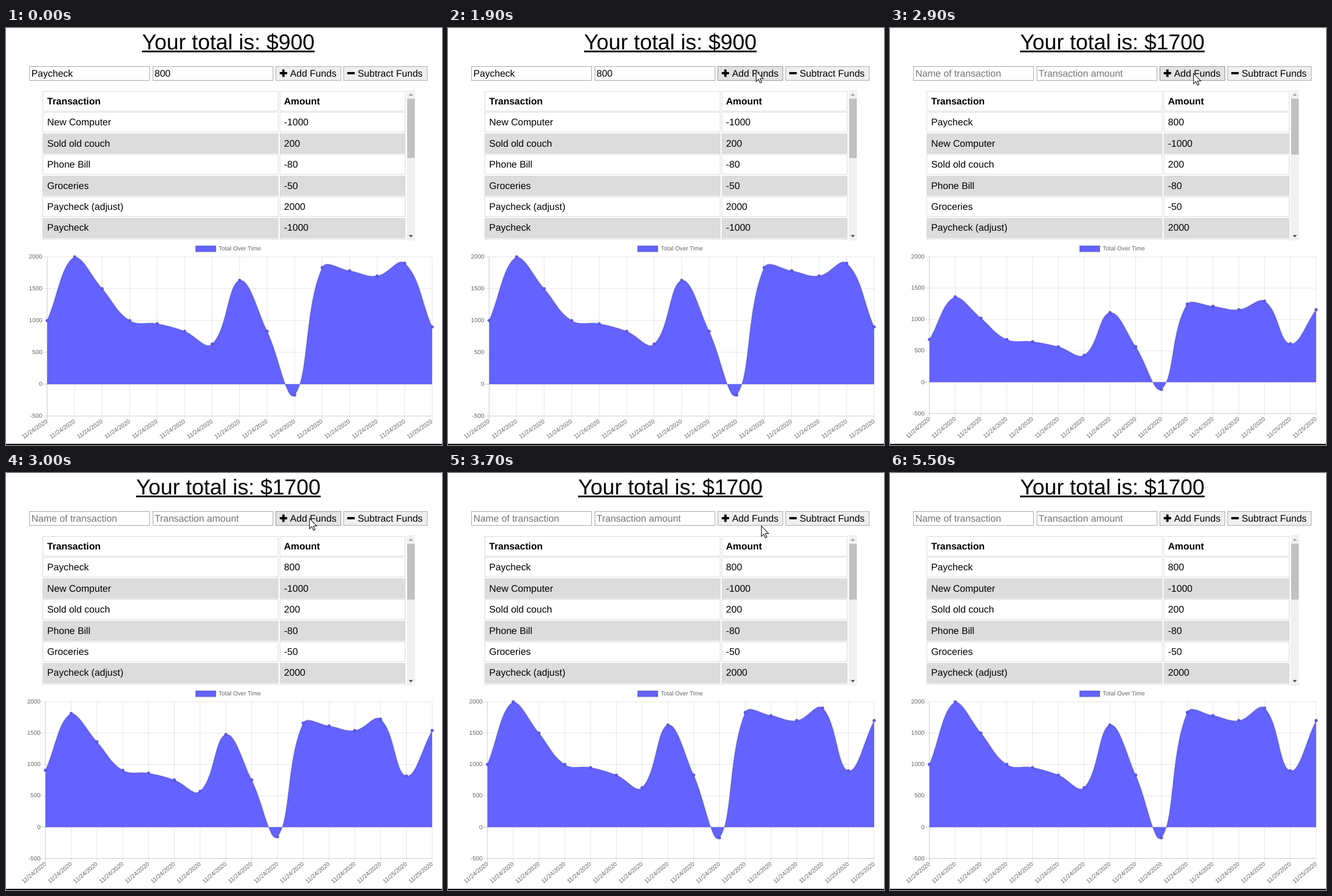
These frames come from a looping animation (752 by 720 pixels, 5.8 s). An HTML page with a canvas:

```html
<!DOCTYPE html>
<html lang="en">
<head>
<meta charset="utf-8">
<title>Budget tracker</title>
<style>
html, body { margin: 0; width: 100%; height: 100%; overflow: hidden; background: #fff; }
canvas { position: absolute; left: 0; top: 0; display: block; }
h1 {
  position: absolute; left: 15px; top: 3px; width: 737px; margin: 0;
  font: 37.35px/42px Arial, "Liberation Sans", sans-serif;
  text-align: center; text-decoration: underline; text-decoration-skip-ink: none;
  text-rendering: geometricPrecision; color: #000;
}
</style>
</head>
<body>
<canvas id="stage" width="752" height="720"></canvas>
<h1 id="total"></h1>
<script>
const ctx = document.getElementById("stage").getContext("2d");
const heading = document.getElementById("total");
const FONT = "Arial, 'Liberation Sans', sans-serif";
const LOOP = 5800;
const ADDED_AT = 2900;

const TICKS = [0, 1, 3, 6, 7, 9, 10, 12, 13, 14, 16, 17, 19, 20, 22, 23, 24, 26, 27,
  29, 30, 32, 33, 35, 36, 37, 39, 40, 42, 43, 45, 46, 47, 49, 50, 52, 53, 55];

const ENTRIES = [
  ["Paycheck", 800], ["New Computer", -1000], ["Sold old couch", 200],
  ["Phone Bill", -80], ["Groceries", -50], ["Paycheck (adjust)", 2000],
  ["Paycheck", -1000], ["Paycheck", 800]
];
const TOTALS = [1000, 2000, 1500, 1000, 950, 830, 630, 1630, 830, -170,
  1830, 1780, 1700, 1900, 900, 1700];

const BEFORE = { total: 900, count: 15, left: 71, bottom: 670, tilt: 34, thumb: 102.5 };
const AFTER = { total: 1700, count: 16, left: 68, bottom: 665.5, tilt: 40, thumb: 96.5 };

// Pointer path: time, x, y.
const PATH = [
  [600, 600, 470], [700, 538, 330], [900, 527, 219], [1000, 531, 74], [1900, 531, 74],
  [2300, 523, 78], [3300, 523, 78], [3700, 540, 91], [4000, 596, 270],
  [4300, 690, 432], [4500, 736, 470]
];

ctx.textRendering = "geometricPrecision";

function rect(x, y, w, h, fill, line) {
  ctx.fillStyle = fill;
  ctx.fillRect(x, y, w, h);
  if (!line) return;
  ctx.strokeStyle = line;
  ctx.lineWidth = 1;
  ctx.strokeRect(x + 0.5, y + 0.5, w - 1, h - 1);
}

function text(str, x, y, size = 16.55, color = "#000", weight = "", align = "left", base = "alphabetic") {
  ctx.font = `${weight} ${size}px ${FONT}`;
  ctx.fillStyle = color;
  ctx.textAlign = align;
  ctx.textBaseline = base;
  ctx.fillText(str, x, y);
}

function line(x1, y1, x2, y2, color) {
  ctx.strokeStyle = color;
  ctx.lineWidth = 0.9;
  ctx.beginPath();
  ctx.moveTo(x1, y1);
  ctx.lineTo(x2, y2);
  ctx.stroke();
}

function poly(points) {
  ctx.beginPath();
  points.forEach(([x, y]) => ctx.lineTo(x, y));
  ctx.closePath();
}

function bar(x, y, w, h) {
  ctx.fillStyle = "#000";
  ctx.beginPath();
  ctx.roundRect(x, y, w, h, 1);
  ctx.fill();
}

function drawForm(t) {
  const done = t >= ADDED_AT;
  const fields = done ? ["Name of transaction", "Transaction amount"] : ["Paycheck", "800"];
  fields.forEach((str, i) => {
    const x = 40 + i * 212.5;
    rect(Math.round(x), 66, 208, 25, "#fff", "#a6a6a6");
    text(str, x + 3.7, 84, 16.55, done ? "#757575" : "#000");
  });

  let look = ["#efefef", "#adadad"];
  if (t >= 1200 && t < 3600) look = ["#e3e3e3", "#939393"];
  if (t >= 2600 && t < ADDED_AT) look = ["#f4f4f4", "#bdbdbd"];
  rect(465, 66, 113, 25, ...look);
  rect(582, 66, 145, 25, "#efefef", "#adadad");
  bar(472, 76, 13, 4);
  bar(476.5, 71.5, 4, 13);
  bar(588.5, 76, 13, 4);
  text("Add Funds", 490, 84);
  text("Subtract Funds", 606.5, 84);
}

function drawTable(state) {
  const rows = ENTRIES.slice(state === AFTER ? 0 : 1);
  ctx.save();
  ctx.beginPath();
  ctx.rect(60, 107, 650, 260);
  ctx.clip();
  for (let i = 0; i < 8; i++) {
    const top = 109 + 36.45 * i;
    const y = Math.round(top);
    const fill = i && i % 2 === 0 ? "#dcdcdc" : "#fff";
    rect(63, y, 407, 35, fill, "#dadada");
    rect(472, y, 217, 35, fill, "#dadada");
    const [name, amount] = i ? rows[i - 1] || ["", ""] : ["Transaction", "Amount"];
    const weight = i ? "" : "bold";
    const size = i ? 16.55 : 16.45;
    const base = Math.round(top + 22.75);
    text(name, 71, base, size, "#000", weight);
    text(amount, 479.5, base, size, "#000", weight);
  }
  ctx.restore();

  rect(691, 107, 14.5, 260, "#f1f1f1");
  rect(692, 122, 13, state.thumb, "#c1c1c1");
  ctx.fillStyle = "#a3a3a3";
  poly([[694.5, 117], [698.2, 113], [702, 117]]);
  ctx.fill();
  ctx.fillStyle = "#505050";
  poly([[694.5, 357.5], [698.2, 361.5], [702, 357.5]]);
  ctx.fill();
}

// Smooth curve handles with tension 0.4, kept inside the plot.
function addHandles(pts, box) {
  const cap = (x, y) => [
    Math.min(Math.max(x, box.left), box.right),
    Math.min(Math.max(y, box.top), box.bottom)
  ];
  pts.forEach((p, i) => {
    const a = pts[i - 1] || p, b = pts[i + 1] || p;
    const da = Math.hypot(p.x - a.x, p.y - a.y);
    const db = Math.hypot(b.x - p.x, b.y - p.y);
    const ka = 0.4 * da / (da + db), kb = 0.4 * db / (da + db);
    p.in = cap(p.x - ka * (b.x - a.x), p.y - ka * (b.y - a.y));
    p.out = cap(p.x + kb * (b.x - a.x), p.y + kb * (b.y - a.y));
  });
}

function drawLegend() {
  rect(327, 376, 35, 10.4, "#6463ff");
  ctx.strokeStyle = "rgba(0,0,0,0.1)";
  ctx.lineWidth = 2.6;
  ctx.strokeRect(327, 376, 35, 10.4);
  text("Total Over Time", 366.8, 381.2, 10.4, "#666", "", "left", "middle");
}

function drawChart(state, grow) {
  const { left, bottom, count, tilt } = state;
  const top = 395, right = 735;
  const step = (right - left) / (count - 1);
  const yOf = v => top + (2000 - v) / 2500 * (bottom - top);
  const zero = yOf(0);
  const faint = "rgba(0,0,0,0.12)", strong = "rgba(0,0,0,0.25)";

  for (let v = 2000; v >= -500; v -= 500) {
    const y = yOf(v);
    line(left - 8.7, y, right, y, v ? faint : strong);
    text(v, left - 8.5, y + 0.3, 10.4, "#666", "", "right", "middle");
  }
  line(left, bottom, right, bottom, faint);
  for (let i = 0; i < count; i++) {
    const x = left + i * step;
    line(x, top, x, bottom + 8.7, i ? faint : strong);
    ctx.save();
    ctx.translate(x, bottom + 8.7);
    ctx.rotate(-tilt * Math.PI / 180);
    text(`11/${i < 14 ? 24 : 25}/2020`, 0, 0, 10.3, "#666", "", "right", "middle");
    ctx.restore();
  }

  const pts = TOTALS.slice(0, count).map((v, i) => ({ x: left + i * step, y: yOf(v) }));
  addHandles(pts, { left, right, top, bottom });
  const rise = y => zero + (y - zero) * grow;
  const curve = () => {
    ctx.lineTo(pts[0].x, rise(pts[0].y));
    for (let i = 1; i < count; i++) {
      const [ax, ay] = pts[i - 1].out, [bx, by] = pts[i].in;
      ctx.bezierCurveTo(ax, rise(ay), bx, rise(by), pts[i].x, rise(pts[i].y));
    }
  };

  ctx.save();
  ctx.beginPath();
  ctx.rect(left - 1.3, top - 1.3, right - left + 2.6, bottom - top + 2.6);
  ctx.clip();
  ctx.beginPath();
  ctx.moveTo(left, zero);
  curve();
  ctx.lineTo(right, zero);
  ctx.closePath();
  ctx.fillStyle = "#6463ff";
  ctx.fill();
  ctx.beginPath();
  curve();
  ctx.strokeStyle = "rgba(0,0,0,0.1)";
  ctx.lineWidth = 2.6;
  ctx.stroke();
  ctx.restore();

  ctx.strokeStyle = "rgba(0,0,0,0.1)";
  ctx.lineWidth = 0.9;
  for (const p of pts) {
    ctx.beginPath();
    ctx.arc(p.x, rise(p.y), 2.6, 0, Math.PI * 2);
    ctx.fillStyle = "#5b57f6";
    ctx.fill();
    ctx.stroke();
  }
}

function drawPointer(t) {
  const k = PATH.findIndex(p => p[0] >= t);
  if (k < 0 || t < PATH[0][0]) return;
  const b = PATH[k], a = PATH[k - 1] || b;
  const u = a === b ? 0 : (t - a[0]) / (b[0] - a[0]);
  ctx.save();
  ctx.translate(a[1] + (b[1] - a[1]) * u + 0.5, a[2] + (b[2] - a[2]) * u + 0.5);
  ctx.scale(1.08, 1.08);
  poly([[0, 0], [0, 16.5], [3.8, 13], [6.3, 18.8], [8.8, 17.8], [6.3, 12], [11.5, 12]]);
  ctx.fillStyle = "#fff";
  ctx.strokeStyle = "#111";
  ctx.lineWidth = 1;
  ctx.fill();
  ctx.stroke();
  ctx.restore();
}

function draw(now) {
  const t = 100 * TICKS.findLast(tick => tick * 100 <= now);
  const state = t < ADDED_AT ? BEFORE : AFTER;
  const u = Math.min((t - 2776) / 500, 1);
  const grow = state === AFTER ? 1 - (1 - u) ** 4 : 1;
  const title = `Your total is: $${state.total}`;
  if (heading.textContent !== title) heading.textContent = title;

  rect(0, 0, 752, 720, "#fff");
  drawForm(t);
  drawTable(state);
  drawLegend();
  drawChart(state, grow);
  rect(0, 718, 752, 2, "#000");
  drawPointer(t);
}

const start = performance.now();
function loop() {
  draw((performance.now() - start) % LOOP);
  requestAnimationFrame(loop);
}
loop();
</script>
</body>
</html>
```
